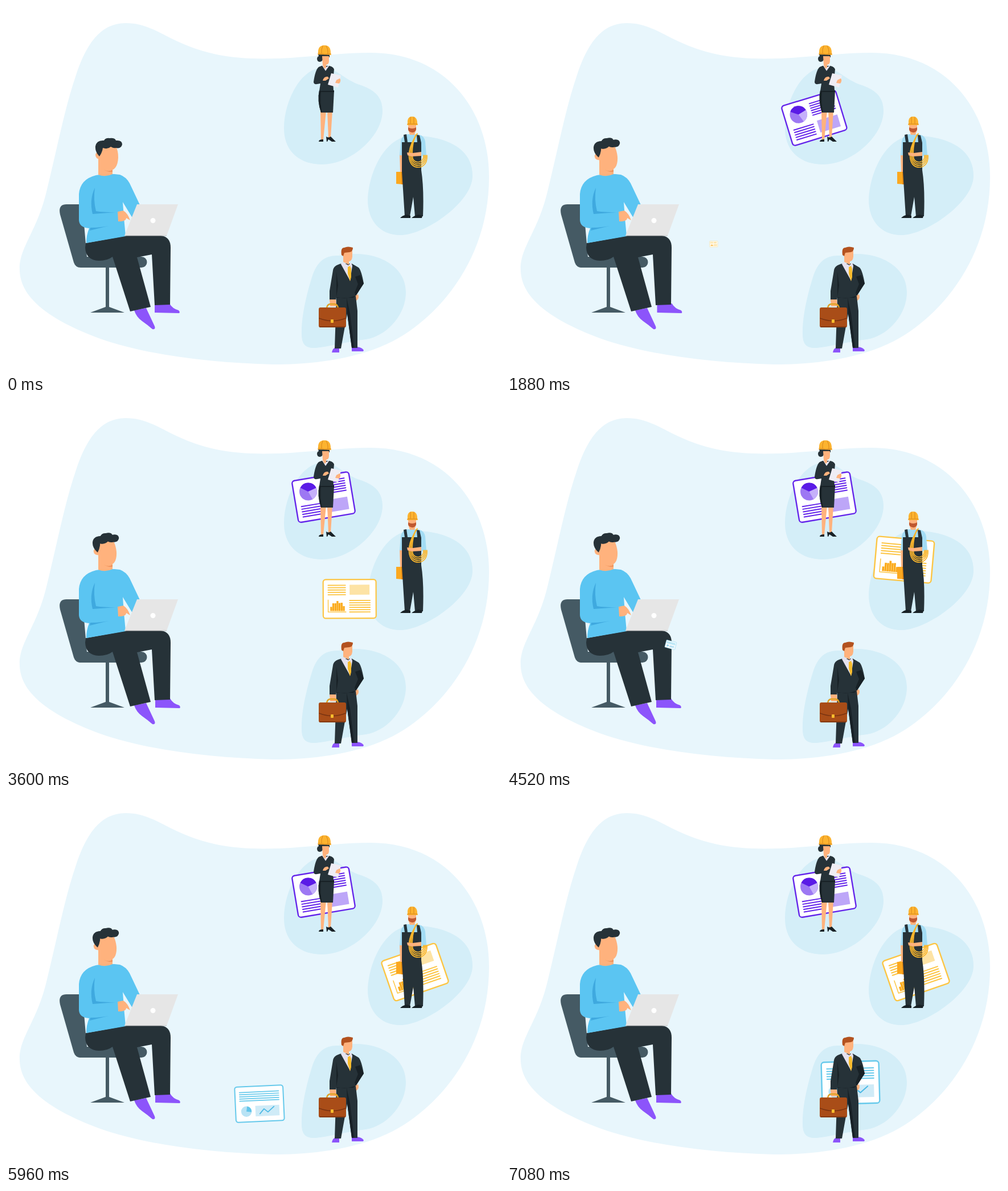
An HTML page for the animation above (7160 ms loop, 869 by 644 pixels).

```html
<!DOCTYPE html>
<html lang="en">
<head>
<meta charset="utf-8">
<title>Sharing reports with the team</title>
<style>
html, body { margin: 0; width: 869px; height: 644px; overflow: hidden; background: #fff; }
svg { display: block; }
text { font: 32px Lato, sans-serif; fill: #10202a; stroke: #10202a; stroke-width: .5; text-anchor: middle; }
.dark { fill: #263238; }
.deep { fill: #182126; }
.skin { fill: #ffb27d; }
.shade { fill: #f0955f; }
.hat { fill: #fcb32f; }
.fold { fill: #3fa9df; }
.shoe { fill: #8c54fb; }
.chair { fill: #455a64; }
.blob { fill: #d4eef8; }
.line { fill: none; stroke-linecap: round; stroke-linejoin: round; }
</style>
</head>
<body>
<svg width="869" height="644" viewBox="0 0 869 644">
  <path fill="#e8f6fc" d="M24 465C22 425 52 400 70 330C92 240 103 180 122 124C140 68 165 30 210 30C262 30 285 66 365 84C455 104 555 82 640 82C770 82 848 180 848 300C848 422 785 520 700 576C635 618 545 629 470 629C350 626 230 610 150 578C70 546 26 510 24 465Z"/>
  <path class="blob" d="M488 214C488 172 512 118 548 109C575 102 590 128 620 138C645 146 661 158 661 184C661 228 606 278 555 278C515 278 488 255 488 214Z"/>
  <path class="blob" d="M635 340C636 298 661 231 712 227C765 228 819 245 819 298C819 345 735 402 692 402C655 402 635 375 635 340Z"/>
  <path class="blob" d="M519 576C518 545 528 505 537 476C546 448 560 437 584 438C594 437 602 435 614 435C660 435 702 460 702 502C702 545 665 580 632 585C590 590 560 600 540 600C525 600 519 592 519 576Z"/>

  <g id="sitter">
    <path class="chair" d="M95 366Q91 348 106 348H134L142 440H238A9.5 9.5 0 0 1 238 459H131Q122 459 119 450ZM175 458H181V528L208 538H148L175 528Z"/>
    <path class="shoe" d="M225 534L246 530L261 562Q263 568 257 567Q249 560 239 553Q229 546 225 534Z"/>
    <path id="foot" class="shoe" d="M261 522L287 522Q292 531 303 534Q306 537 304 539L261 538Z"/>
    <path class="dark" d="M140 416L212 403H272Q289 405 289 424L288 524L261 525L256 436L230 441L254 528L218 536L187 440Q178 447 163 447Q140 446 139 424Z"/>
    <path fill="#5bc5f2" d="M158 297Q178 293 200 296Q211 300 217 311L235 349L222 372L205 344L207 372L210 404L141 416Q141 402 146 390Q129 389 128 376V330Q130 304 158 297Z"/>
    <path class="fold" d="M156 319Q146 340 152 365L193 362Q172 362 158 360Q153 340 156 319ZM148 389Q170 389 194 383Q170 388 147 394Z"/>
    <path class="skin" d="M162 268H187V295Q174 301 162 296Z"/>
    <path class="shade" d="M172 287Q180 292 187 287V291Q178 292 172 287Z"/>
    <g id="head">
      <path class="skin" d="M166 244H192Q197 252 197 266Q196 289 180 289Q168 288 165 269Q157 268 157 261Q158 256 163 257Z"/>
      <path class="dark" d="M164 264Q156 256 157 246Q159 235 172 236Q175 231 182 232Q191 231 193 236Q204 235 204 243Q202 251 193 249Q189 250 184 247Q178 252 170 249Q169 257 164 264Z"/>
    </g>
    <path fill="#e6e6e6" d="M230 348H302L282 403H208Z"/>
    <path d="M208 403H282" stroke="#bdbdbd"/>
    <circle cx="258" cy="376.500" r="4.500" fill="#fff"/>
    <path class="skin" d="M196 361L206 359Q214 364 218 376L211 372Q211 378 197 378Z"/>
  </g>

  <g id="cards"></g>

  <g id="engineer">
    <path class="skin" d="M552 184H562L557 235H553ZM564 184H573L570 231H566Z"/>
    <path class="deep" d="M549 238Q549 234 557 234V238ZM562 229Q566 232 570 229L579 238H572L566 234L564 238H563Z"/>
    <path class="dark" d="M550 148H576L574 187H553Q546 166 550 148Z"/>
    <path class="deep" d="M550 148H576V151H553Q551 170 555 187H553Q546 166 550 148Z"/>
    <path class="dark" d="M554 105L549 107Q543 112 540 133Q540 138 546 137L552 136L550 149H575L574 132L576 111Q574 106 567 105Z"/>
    <path fill="#e8e6f2" d="M554 103L561 114L568 104L562 107Z"/>
    <path class="dark" d="M548 85H568V90H560L554 97Q547 100 546 93Q546 89 549 88Z"/>
    <path class="skin" d="M555 88H567V96Q567 103 562 103V108L559 110L556 104Z"/>
    <path fill="#efedf4" d="M571 118L588 122L583 143L565 138Z"/>
    <path class="skin" d="M556 131Q558 123 565 124L567 127L561 131ZM580 130L586 127Q589 131 585 136L578 135Z"/>
    <path class="hat" d="M548 83Q547 69 559 69Q570 69 570 82L571 86L547 85Z"/>
    <path class="line" stroke="#d9861c" d="M556 70Q553 76 554 83M562 70Q566 76 565 84M548 83Q560 86 570 84"/>
  </g>

  <g id="builder">
    <path class="skin" d="M691 260H697L696 291H692Z"/>
    <path fill="#fba81f" d="M685 291H698V313L685 312Z"/>
    <path fill="#e58a14" d="M694 291H698V313H694Z"/>
    <path fill="#a3dcf4" d="M705 225H721Q734 226 736 238L738 262L728 264L697 262H691L693 237Q695 227 705 225Z"/>
    <path class="dark" d="M698 226L703 225L705 239H722L721 226L726 227L729 240V288Q734 320 732 369H718L715 335L709 369H700L695 290V239H700Z"/>
    <path class="deep" d="M692 372Q695 368 703 366L710 368V372ZM712 372Q716 368 724 366L731 368L730 372Z"/>
    <path class="skin" d="M706 206H720V217L717 226H709L706 217Z"/>
    <path fill="#bf5830" d="M706 213Q713 217 720 213V217Q718 222 713 222Q707 221 706 217Z"/>
    <g id="rope" class="line" stroke="#f9b52c" stroke-width="1.700"></g>
    <path class="skin" d="M704 257L714 258L729 256V263L712 264L705 262Z"/>
    <path class="hat" d="M705 206Q704 194 713 194Q722 194 722 206L723 209H704Z"/>
    <path class="line" stroke="#d9861c" d="M710 195V206M716 195V206M705 207H722"/>
  </g>

  <g id="manager">
    <path class="shoe" d="M572 608Q573 600 580 599L585 601V608ZM607 606V599L616 598Q625 599 628 604L627 606Z"/>
    <path class="skin" d="M612 508L618 506Q621 513 615 517L612 514Z"/>
    <path class="dark" d="M580 509H614L617 535V600H607L599 540L588 601H577Z"/>
    <path class="deep" d="M598 512L604 540L611 600H607L599 540Z"/>
    <path class="dark" d="M589 452Q575 455 574 464L568 500V517H579L580 511Q600 515 613 509L628 487Q624 464 619 459L607 452Z"/>
    <path class="deep" d="M613 475L618 488L612 503L614 509L628 487L622 472ZM580 466L583 490L579 517L580 511Q600 515 613 508L610 512H580Z"/>
    <path fill="#e5e2ef" d="M590 449L588 453L604 482L608 456L606 450L601 455Z"/>
    <path class="skin" d="M592 430H608V440Q607 448 602 448V454L592 449Z"/>
    <path fill="#f8bc2d" d="M600 458L604 456L606 461V476L604 483L600 470Z"/>
    <path fill="#b3521f" d="M589 437Q587 424 594 424Q600 421 609 424Q609 431 603 432L594 433L592 439Z"/>
    <path class="skin" d="M568 515H579L580 527H569Z"/>
    <path class="line" stroke="#dfa123" stroke-width="2.500" d="M563 530Q564 523 570 523H576Q582 523 583 530"/>
    <rect x="549" y="529" width="48" height="35" rx="3" fill="#a94d18"/>
    <path class="line" stroke="#7a3411" stroke-width="1.500" d="M550 548Q573 557 596 548M551 563H595"/>
    <rect x="570" y="550" width="5" height="6" rx="1" fill="#f8bc2d"/>
  </g>

  <g id="labels">
    <text><tspan x="284" y="134">Space</tspan><tspan x="283" y="169">Management</tspan></text>
    <text x="245" y="164">MEP</text>
    <text x="255" y="164">Finance</text>
  </g>
</svg>
<script>
const LOOP = 7160, STEP = 40;
const find = id => document.getElementById(id);
const repeat = (n, make) => Array.from({ length: n }, (_, i) => make(i)).join('');

find('rope').innerHTML = repeat(4, i =>
  `<path d="M${722 - i} ${224 + i}Q${705 + i * 2} 248 ${708 + i * 2} 268Q${711 + i * 2} ${283 - i * 3} 724 ${283 - i * 3}Q${740 - i * 2} ${281 - i * 3} ${739 - i * 2} 262"/>`);

// Card parts, measured from the card's centre
const rules = (x1, x2, y, n, gap) =>
  `<path class="line" stroke-width="2" d="${repeat(n, i => `M${x1} ${y + i * gap}H${x2}`)}"/>`;
const box = (x, y, w, h, fill) => `<rect x="${x}" y="${y}" width="${w}" height="${h}" fill="${fill}" stroke="none"/>`;
const disc = (x, y, r, fill) => `<circle cx="${x}" cy="${y}" r="${r}" fill="${fill}" stroke="none"/>`;
const wedge = (x, y, r, from, to, fill) => {
  const at = a => `${x + r * Math.cos(a * Math.PI / 180)} ${y + r * Math.sin(a * Math.PI / 180)}`;
  return `<path fill="${fill}" stroke="none" d="M${x} ${y}L${at(from)}A${r} ${r} 0 0 1 ${at(to)}Z"/>`;
};
const bar = i => {
  const h = 8 + 8 * Math.sin(i / 2) + i % 2 * 3;
  return box(-37 + i * 4, 23 - h, 3.6, h, '#fbab1c');
};

// Each card comes out of the laptop, waits, flies to a worker and settles there.
// Stops are x, y and tilt.
const flights = [
  {
    color: '#6425ea', out: [0, 700], fly: [1120, 2060], settle: [2060, 3400], label: [360, 1600],
    stops: [[260, 390, 20], [383, 361, -17], [556, 179, -17], [557.5, 168.7, -9.5]],
    body: disc(-25, -14, 15.5, '#9d78f3') + wedge(-25, -14, 15.5, 215, 345, '#5a1ae6') +
      wedge(-25, -14, 15.5, -15, 70, '#c5b0fa') +
      rules(-1, 41, -27, 6, 4.3) + rules(-41, -5, 10, 5, 4.6) + box(3, 6, 38, 22, '#bda6f8')
  },
  {
    color: '#fcc544', out: [1683, 2880], fly: [2880, 4320], settle: [4520, 5040], label: [2400, 3200],
    stops: [[334, 418, 0], [509.5, 416, -5.5], [697, 278.5, 5], [718, 309, -19]],
    body: rules(-41, -8, -26, 5, 4.5) + box(0, -27, 38, 19, '#fde3a5') + repeat(7, bar) +
      '<path class="line" stroke-width="1.5" d="M-41 2V25H-7"/>' + rules(0, 39, 3, 6, 4.4)
  },
  {
    color: '#66c9eb', out: [4125, 5960], fly: [6040, 7080], settle: [7080, LOOP], label: [5240, 5840],
    stops: [[244, 397, 20], [445, 540, -2.6], [603, 503, -1.5], [603, 503, -1.5]],
    body: rules(-41, 41, -25, 5, 4.5) + disc(-28, 15, 11, '#b8e3f5') + wedge(-28, 15, 11, -80, 10, '#62c5ea') +
      box(-9, 4, 50, 22, '#cfebf7') +
      '<path class="line" stroke="#4bb9e5" stroke-width="2" d="M0 21L9 11L17 18L30 7"/>'
  }
];

find('cards').innerHTML = flights.map(f =>
  `<g stroke="${f.color}"><rect x="-50.500" y="-37" width="101" height="74" rx="5" fill="#fff" stroke-width="2.400"/>${f.body}</g>`).join('');

const ramp = (t, [from, to]) => Math.max(0, Math.min(1, (t - from) / (to - from)));
const ease = (t, span) => { const u = ramp(t, span); return u * u * (3 - 2 * u); };
const mix = (a, b, p) => a + (b - a) * p;

const cards = [...find('cards').children], labels = [...find('labels').children];

function drawFlight(f, i, t) {
  const out = ramp(t, f.out), fly = ease(t, f.fly), settle = ease(t, f.settle);
  const [from, wait, land, rest] = f.stops;
  const [x, y, tilt] = from.map((v, k) => mix(mix(mix(v, wait[k], out), land[k], fly), rest[k], settle));
  const size = mix(.84 * out, 1, fly);
  cards[i].setAttribute('transform', `translate(${x} ${y}) rotate(${tilt}) scale(${size})`);
  cards[i].style.visibility = out > 0 ? 'visible' : 'hidden';
  const [on, off] = f.label;
  labels[i].style.opacity = Math.min(ramp(t, [on, on + 160]), 1 - ramp(t, [off - 160, off]));
}

function draw(t) {
  flights.forEach((f, i) => drawFlight(f, i, t));
  const turn = ease(t, [1440, 1880]);
  find('head').setAttribute('transform', `rotate(${mix(ease(t, [0, 1120]), -6.5, turn)} 178 292)`);
  find('foot').setAttribute('transform', `translate(${2.5 * turn - 1.5 * ease(t, [1880, 2600])} 0)`);
}

function tick() {
  const t = performance.now() % LOOP;
  draw(Math.min(Math.floor(t / STEP) * STEP, LOOP - 2 * STEP));
  requestAnimationFrame(tick);
}
tick();
</script>
</body>
</html>
```
